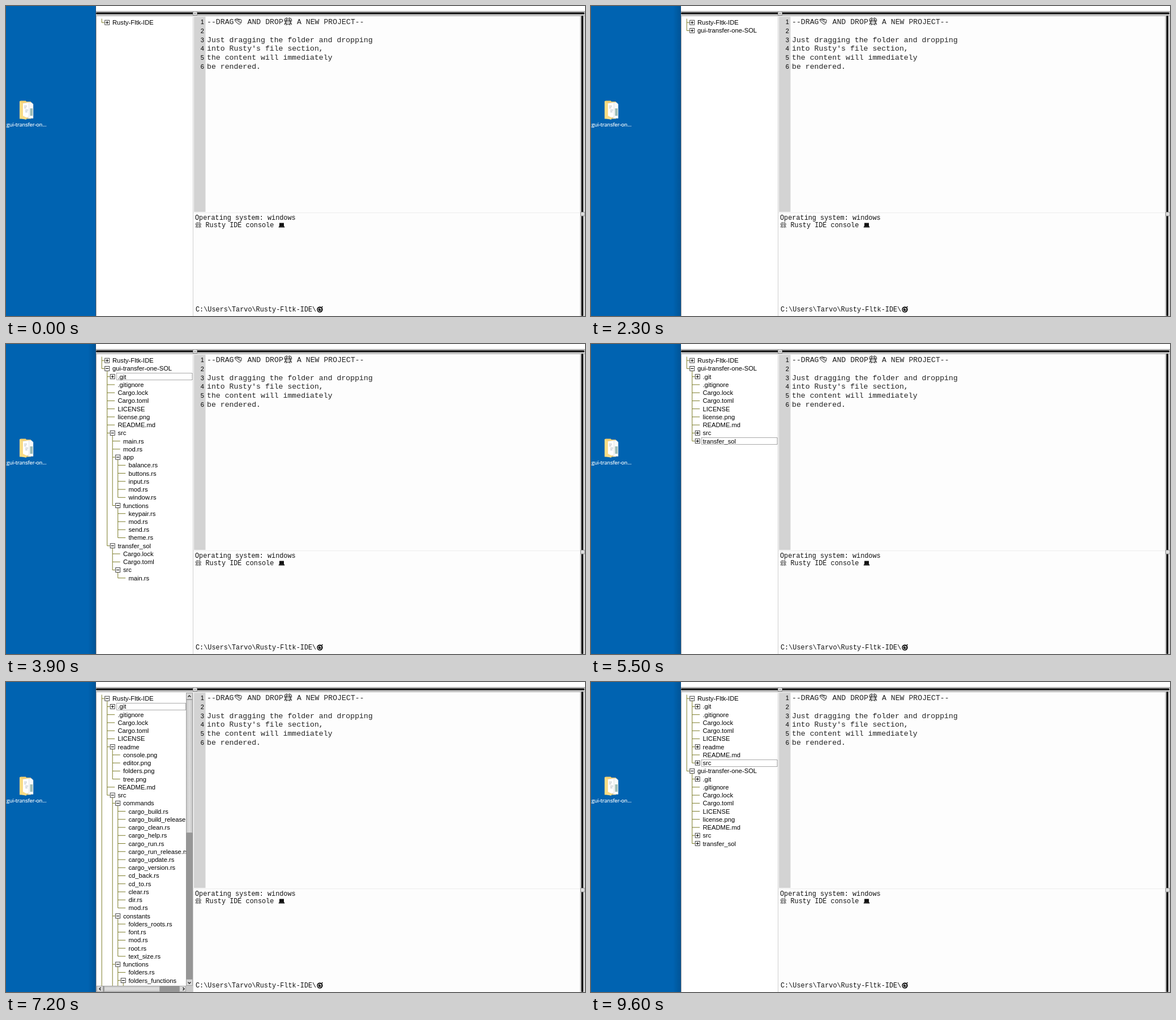
Recreate the animation shown at these times as an HTML page. Size 1023 by 548 pixels, loop 9700 ms.

```html
<!DOCTYPE html>
<html lang="en">
<head>
<meta charset="utf-8">
<title>Drag and drop a project</title>
<style>
  html, body { margin: 0; width: 100%; height: 100%; overflow: hidden; background: #fff; }
  svg { display: block; width: 1023px; height: 548px; }
  text { white-space: pre; }
  .tree text, .num { font: 11.2px "Liberation Sans", Arial, sans-serif; }
  .code { font: 13.19px "Liberation Mono", monospace; fill: #222; }
  .term { font: 11.85px "Liberation Mono", monospace; fill: #111; }
  .label { font: 9.1px "Open Sans", sans-serif; fill: #fff; stroke: #fff; stroke-width: .2; }
</style>
</head>
<body>
<svg id="stage" viewBox="0 0 1023 548" xmlns="http://www.w3.org/2000/svg"></svg>
<script>
const LOOP = 9700, ROW = 14.24, TOP = 29.2, INDENT = 9.5;

const rect = (x, y, w, h, fill, extra = '') =>
  `<rect x="${x}" y="${y}" width="${w}" height="${h}" fill="${fill}" ${extra}/>`;
const path = (d, stroke, width = 1, fill = 'none') =>
  `<path d="${d}" stroke="${stroke}" stroke-width="${width}" fill="${fill}"/>`;
const text = (x, y, s, cls = '', extra = '') =>
  `<text x="${x}" y="${y}" class="${cls}" ${extra}>${s}</text>`;
const group = (id, body, extra = '') => `<g id="${id}" ${extra}>${body}</g>`;

/* ---- tree contents: one row per line, leading spaces give the depth, "+" marks a closed folder ---- */
const nest = (n, rows) => rows.map(r => ' '.repeat(n) + r);
const list = s => s.trim().split(' ');
const folder = (name, rows) => [name, ...nest(1, rows)];

const hooks = list('applypatch-msg commit-msg fsmonitor-watchman post-update pre-applypatch pre-commit ' +
  'pre-merge-commit pre-push pre-rebase pre-receive prepare-commit-msg push-to-checkout update')
  .map(n => n + '.sample');
const git = objects => folder('.git', [
  'COMMIT_EDITMSG', 'config', 'description', 'HEAD',
  ...folder('hooks', hooks),
  'index',
  ...folder('info', ['exclude']),
  ...folder('logs', ['HEAD', ...folder('refs', [
    ...folder('heads', ['main']),
    ...folder('remotes', folder('origin', ['HEAD', 'main']))])]),
  ...folder('objects', objects),
  'refs']);

const cargo = list('.gitignore Cargo.lock Cargo.toml LICENSE');
const guiFiles = [...cargo, 'license.png', 'README.md'];
const guiSrc = folder('src', ['main.rs', 'mod.rs',
  ...folder('app', list('balance.rs buttons.rs input.rs mod.rs window.rs')),
  ...folder('functions', list('keypair.rs mod.rs send.rs theme.rs'))]);
const guiTransfer = folder('transfer_sol', ['Cargo.lock', 'Cargo.toml', ...folder('src', ['main.rs'])]);
const gui = rows => folder('gui-transfer-one-SOL', rows);
const guiClosed = gui(['+.git', ...guiFiles, '+src', '+transfer_sol']);

const ideSrc = folder('src', [
  ...folder('commands', list('cargo_build cargo_build_release cargo_clean cargo_help cargo_run ' +
    'cargo_run_release cargo_update cargo_version cd_back cd_to clear dir mod').map(n => n + '.rs')),
  ...folder('constants', list('folders_roots.rs font.rs mod.rs root.rs text_size.rs')),
  ...folder('functions', ['folders.rs',
    ...folder('folders_functions', list('btn_add_folder.rs btn_delete_folder.rs delete_file.rs ' +
      'render_all_files_in.rs mod.rs')),
    'mod.rs']),
  'main.rs']);
const ide = rows => folder('Rusty-Fltk-IDE', rows);
const ideOpen = readme => [...ide(['+.git', ...cargo, ...readme, 'README.md', ...ideSrc]), '+gui-transfer-one-SOL'];

/* at: start in ms, focus: row with the dotted frame, bars: [vertical thumb end, horizontal thumb end] */
const steps = [
  { at: 0, rows: ['+Rusty-Fltk-IDE'] },
  { at: 2300, rows: ['+Rusty-Fltk-IDE', '+gui-transfer-one-SOL'] },
  { at: 3400, focus: 1, bars: [243, 229], rows: ['+Rusty-Fltk-IDE',
    ...gui([...git([...folder('50', ['b9eab7380c126973']), '+54']), ...guiFiles])] },
  { at: 3900, focus: 2, rows: ['+Rusty-Fltk-IDE', ...gui(['+.git', ...guiFiles, ...guiSrc, ...guiTransfer])] },
  { at: 4900, focus: 9, rows: ['+Rusty-Fltk-IDE', ...gui(['+.git', ...guiFiles, '+src', ...guiTransfer])] },
  { at: 5500, focus: 10, rows: ['+Rusty-Fltk-IDE', ...guiClosed] },
  { at: 6600, focus: 0, bars: [120, 230], rows: [
    ...ide([...git([...folder('03', ['e0863fbeef63170b52']), ...folder('09', ['4c1d'])]), ...cargo]),
    '+gui-transfer-one-SOL'] },
  { at: 7200, focus: 1, bars: [267, 272],
    rows: ideOpen(folder('readme', list('console.png editor.png folders.png tree.png'))) },
  { at: 8000, focus: 6, bars: [278, 272], rows: ideOpen(['+readme']) },
  { at: 8600, focus: 8, rows: [...ide(['+.git', ...cargo, '+readme', 'README.md', '+src']), ...guiClosed] },
];

function scrollbars([vEnd, hEnd]) {
  const edge = 'stroke="#a2a2a2"';
  const button = (x, y, h, arrow) => rect(x + .5, y + .5, 11, h - 1, '#d8d8d8', edge) + path(arrow, '#222', 1.4);
  return rect(318, 19, 12, 529, '#969696') + rect(160, 537, 170, 11, '#969696') +
    rect(318.5, 31.5, 11, vEnd - 32, 'url(#thumbV)', edge) +
    rect(173.5, 537.5, hEnd - 174, 10, 'url(#thumbH)', edge) +
    button(318, 19, 12, 'M321.5 26.5l2.5-2.5 2.5 2.5') + button(318, 525, 12, 'M321.5 530.5l2.5 2.5 2.5-2.5') +
    button(160, 537, 11, 'M167.5 540l-2.5 2.5 2.5 2.5') + button(306, 537, 11, 'M312.5 540l2.5 2.5-2.5 2.5') +
    rect(318, 537, 12, 11, '#c8c8c8');
}

function tree({ rows, focus, bars }, i) {
  const items = rows.map((row, n) => {
    const depth = row.search(/\S/), name = row.trim();
    return { depth, closed: name[0] === '+', name: name.replace('+', ''), y: TOP + n * ROW };
  });
  let lines = '', marks = '';
  items.forEach(({ depth, closed, name, y }, n) => {
    const open = n + 1 < items.length && items[n + 1].depth > depth;
    const x = 169.2 + depth * INDENT;
    const above = items.slice(0, n).reverse().find(o => o.depth <= depth);
    lines += `M${x} ${above ? above.y : 22.5}V${y}h${open || closed ? 5 : 13.5}`;
    if (open || closed) {
      const cx = x + INDENT;
      marks += rect(cx - 4, y - 4, 8, 8, '#fff', 'stroke="#333" stroke-width=".9"') +
        path(`M${cx - 2.5} ${y}h5` + (closed ? `M${cx} ${y - 2.5}v5` : ''), '#000', 1.1);
    }
    const tx = 188 + depth * INDENT;
    marks += text(tx, y + 4, name);
    if (n === focus) {
      const left = Math.floor(tx - 2) + .5;
      marks += rect(left, Math.floor(y) - 5.5, (bars ? 317.5 : 329) - left, 12, 'none',
        'stroke="#555" stroke-dasharray="1 1"');
    }
  });
  return group('tree' + i, `<g clip-path="url(#${bars ? 'small' : 'full'})">` +
    path(lines, '#6e6e10', .9) + marks + '</g>' + (bars ? scrollbars(bars) : ''), 'class="tree"');
}

/* ---- small pictures ---- */
const folderIcon =
  path('M24 168.5l2-1h9l1 1.5h8v30.5h-20z', 'none', 0, '#f3cf70') +
  path('M40 170.5h5l3 3v25h-9z', '#cfd6da', .6, '#f7fafb') +
  path('M42.5 181h4.5v13h-4.5z', 'none', 0, '#9dbcb6') +
  path('M29.5 172l11-1.5v26l-11 2z', '#d5d5d5', .6, '#fff') +
  path('M32 177h5M32 180h4M34 184h5M34 187h4', '#8a96a0', .8) +
  path('M24 168.5l6 3.5v22l6 3v4l-12-2.5z', 'none', 0, '#fbdc85') +
  text(1, 213, 'gui-transfer-on...', 'label');

const pinch = path('M404 24.5q2-2.5 5-1.5l6 1q2 1 1 2.5l-1 4q-1 2-4 1.5-5-3-7-7.5zM405 24l7 3.5M408 23l5 2.5M411 28l4 1', '#222', 1);
const crab = (x, y, s) => `<g transform="translate(${x} ${y}) scale(${s})">` +
  path('M6.5 1.5q-5 .5-5 5l1.5 2M6.5 1.5v3q-2 0-3 3M9.5 1.5q5 .5 5 5l-1.5 2M9.5 1.5v3q2 0 3 3' +
    'M4 8q4-2.5 8 0v4q-4 2-8 0zM3 10l-1.5 4M13 10l1.5 4M5 13l-.5 2M11 13l.5 2M6.5 9v1.5M9.5 9v1.5', '#222', 1.1) + '</g>';
const laptop = rect(483, 383.5, 8, 5.5, '#111') + path('M482.5 389h9l1 2.5h-11z', 'none', 0, '#222');
const target = '<circle cx="554.5" cy="536.5" r="5.2" fill="#111"/>' +
  '<circle cx="554.2" cy="536.8" r="2.9" fill="none" stroke="#fff" stroke-width="1"/>' +
  path('M554.5 536.5l4-4', '#fff', 1) + path('M557 533.5l2.5-2.5', '#111', 1.4);

/* ---- fixed parts of the window ---- */
const codeLines = ['', '', 'Just dragging the folder and dropping', "into Rusty's file section,",
  'the content will immediately', 'be rendered.'];
const lineY = n => 32 + n * 15.75;

const editor =
  rect(331, 19, 684, 529, '#fdfdfd') + rect(332, 19, 20.5, 345, '#d3d3d3') +
  codeLines.map((s, n) => text(350, lineY(n), n + 1, 'num', 'text-anchor="end"') +
    text(355, lineY(n), s, 'code')).join('') +
  text(355, 32, '--DRAG', 'code') + pinch + text(418.6, 32, ' AND DROP', 'code') + crab(490.5, 19.5, .98) +
  text(506, 32, ' A NEW PROJECT--', 'code') +
  rect(331, 365, 684, 1, '#ececec') +
  text(334, 377.5, 'Operating system: windows', 'term') +
  crab(334, 381.5, .72) + text(352.5, 391, 'Rusty IDE console', 'term') + laptop +
  text(335, 539.7, 'C:\\Users\\Tarvo\\Rusty-Fltk-IDE\\', 'term') + target;

const frame =
  rect(159, 9, 864, 9, '#cfcfcf') + rect(159, 9, 864, 1, '#9a9a9a') + rect(159, 11.3, 863, 3.2, '#111', 'rx="1.5"') +
  rect(159, 17, 864, 1, '#b0b0b0') +
  rect(330.5, 9.5, 7, 7, '#dcdcdc', 'stroke="#999"') + rect(332.5, 12, 3, 2.5, '#aaa') +
  rect(159, 18, 1, 530, '#b4b4b4') + rect(330, 19, 1, 529, '#cfcfcf') +
  rect(1014, 18, 9, 530, '#d4d4d4') + rect(1016.5, 17, 3.4, 531, '#111', 'rx="1.5"') +
  rect(1015.5, 364.5, 7, 6.5, '#dcdcdc', 'stroke="#999"');

const stage = document.getElementById('stage');
const thumb = (id, dir) => `<linearGradient id="${id}" ${dir}><stop stop-color="#c6c6c6"/>` +
  '<stop offset=".5" stop-color="#dedede"/><stop offset="1" stop-color="#c6c6c6"/></linearGradient>';
stage.innerHTML = `<defs>
  <clipPath id="full"><rect x="160" y="19" width="170" height="529"/></clipPath>
  <clipPath id="small"><rect x="160" y="19" width="158" height="518"/></clipPath>
  ${thumb('thumbV', '')}${thumb('thumbH', 'x2="0" y2="1"')}
  <linearGradient id="shade"><stop stop-opacity="0"/><stop offset="1" stop-opacity=".16"/></linearGradient>
  </defs>` +
  rect(0, 0, 159, 548, '#0063b1') +
  group('shadow', rect(145, 0, 14, 548, 'url(#shade)')) +
  rect(158, 0, 1, 548, '#174f80') +
  group('hover', rect(.5, 162.5, 73, 54, '#fff', 'fill-opacity=".16" stroke="#fff" stroke-opacity=".25"')) +
  folderIcon +
  rect(159, 0, 864, 548, '#fff') + editor + frame +
  steps.map(tree).join('') +
  group('ghost', folderIcon, 'opacity=".6"');

/* ---- motion ---- */
const el = id => document.getElementById(id);
const show = (node, on) => { node.style.visibility = on ? 'visible' : 'hidden'; };
const trees = steps.map((_, i) => el('tree' + i));
const ghost = el('ghost'), hover = el('hover'), shadow = el('shadow');
const drag = [[14, 2], [52, 5], [96, 8]];

function draw(t) {
  const now = steps.findLastIndex(s => s.at <= t);
  trees.forEach((node, i) => show(node, i === now));
  show(hover, t >= 600 && t < 1200);
  show(shadow, t >= 2200);
  const pos = drag[Math.floor((t - 900) / 100)];
  show(ghost, pos);
  if (pos) ghost.setAttribute('transform', `translate(${pos})`);
}

const start = performance.now();
function tick() {
  draw((performance.now() - start) % LOOP);
  requestAnimationFrame(tick);
}
tick();
</script>
</body>
</html>
```
